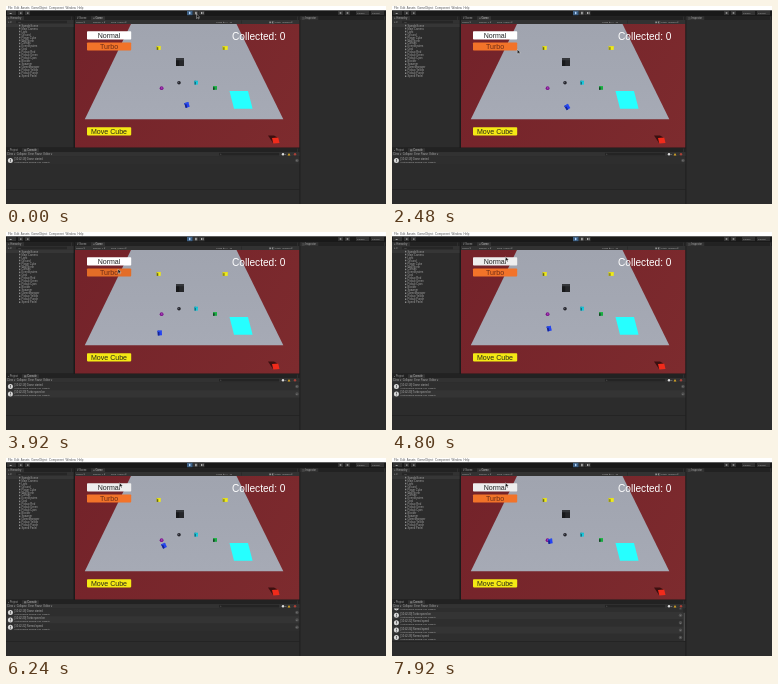
An HTML page with a canvas that plays this animation: 380x198 px, repeating every 8 s.

```html
<!DOCTYPE html>
<html lang="en">
<head>
<meta charset="utf-8">
<title>Cube game in editor</title>
<style>
html, body { margin: 0; width: 100%; height: 100%; overflow: hidden; background: #2c2c2c; }
canvas { display: block; width: 380px; height: 198px; }
</style>
</head>
<body>
<canvas id="stage"></canvas>
<script>
const W = 380, H = 198, LOOP = 8000;
const canvas = document.getElementById('stage');
const dpr = window.devicePixelRatio || 1;
canvas.width = W * dpr;
canvas.height = H * dpr;
const g = canvas.getContext('2d');
const FONT = '"Liberation Sans", Arial, sans-serif';
const PANEL = '#2c2c2c', BAR = '#323232', TABS = '#222', INK = '#aaa', DIM = '#8c8c8c';

function rect(x, y, w, h, fill) {
  g.fillStyle = fill;
  g.fillRect(x, y, w, h);
}
function poly(points, fill) {
  g.fillStyle = fill;
  g.beginPath();
  points.forEach(([x, y]) => g.lineTo(x, y));
  g.closePath();
  g.fill();
}
function dot(x, y, r, fill) {
  g.fillStyle = fill;
  g.beginPath();
  g.arc(x, y, r, 0, Math.PI * 2);
  g.fill();
}
function text(s, x, y, size, fill, align = 'left') {
  g.font = size + 'px ' + FONT;
  g.textAlign = align;
  g.fillStyle = fill;
  g.fillText(s, x, y);
}

// Linear interpolation through [time, x, y] keys
function along(keys, t) {
  let i = 1;
  while (i < keys.length - 1 && t > keys[i][0]) i++;
  const a = keys[i - 1], b = keys[i];
  const k = Math.min(1, Math.max(0, (t - a[0]) / (b[0] - a[0])));
  return [a[1] + (b[1] - a[1]) * k, a[2] + (b[2] - a[2]) * k];
}

const bluePath = [
  [0, 181, 99], [1440, 172.8, 95.5], [2480, 175.3, 101], [3920, 153.8, 101],
  [5520, 160, 93], [6880, 156.3, 83], [7920, 158.3, 83.2]
];
const cursorPath = [
  [960, 190.5, 8], [1440, 104, 43], [1900, 108, 43], [2400, 125.3, 43.5],
  [2750, 125.3, 43.5], [3050, 112, 37], [4500, 112, 37], [4800, 113.5, 24.8]
];
const logTimes = [-1, 3120, 4960, 6480, 6720];
const messages = ['Game started', 'Turbo speed on', 'Normal speed', 'Normal speed', 'Normal speed'];
const objects = ['SampleScene', 'Main Camera', 'Light', 'Ground', 'Player Cube', 'Wall North', 'Canvas',
  'EventSystem', 'Goal', 'Pickup Red', 'Pickup Green', 'Pickup Cyan', 'Blocker', 'Spawner',
  'GameManager', 'Pickup Yellow', 'Pickup Purple', 'Speed Panel'];

function menuBar() {
  rect(0, 3.8, W, 6.4, '#191919');
  rect(0, 0, W, 4.3, '#fff');
  text('File  Edit  Assets  GameObject  Component  Window  Help', 2, 3.2, 2.9, '#555');
  rect(1, 5, 9, 4, BAR);
  text('☁', 3, 8.3, 3, INK);
  for (const x of [12, 19]) {
    rect(x, 5, 5, 4, BAR);
    rect(x + 2, 6.5, 1.5, 1.2, INK);
  }
  rect(181, 4.8, 5.6, 4.4, '#3e6185');
  rect(187, 4.8, 5.6, 4.4, BAR);
  rect(193, 4.8, 5.6, 4.4, BAR);
  poly([[183, 5.6], [185, 7], [183, 8.4]], '#b8d8ff');
  rect(189, 5.8, .7, 2.5, '#ccc');
  rect(190.4, 5.8, .7, 2.5, '#ccc');
  poly([[195, 5.8], [196.7, 7], [195, 8.2]], '#ccc');
  rect(196.8, 5.8, .6, 2.4, '#ccc');
  for (const x of [332, 339]) {
    rect(x, 5, 5, 4, BAR);
    dot(x + 2.5, 7, 1, DIM);
  }
  for (const [x, s] of [[351, 'Layers'], [366, 'Layout']]) {
    rect(x - 1, 5, 13, 4, BAR);
    text(s, x, 8, 2.5, INK);
  }
}

function hierarchy() {
  rect(0, 10.2, 67.5, 131.3, PANEL);
  rect(0, 10.2, 67.5, 3.8, TABS);
  rect(0, 10.2, 18, 3.8, BAR);
  text('≡ Hierarchy', 2, 13.1, 2.6, INK);
  text('⋮', 64, 13.1, 3, INK);
  rect(0, 14, 67.5, 3.8, BAR);
  text('+ ▾', 2, 16.9, 2.7, INK);
  rect(10, 14.7, 51, 2.5, '#262626');
  text('All', 12, 16.7, 2.3, DIM);
  rect(0, 18, 67.5, 3, '#363636');
  objects.forEach((name, i) => {
    const y = 20.6 + i * 2.98;
    rect(13, y - 1.8, 1.3, 1.5, DIM);
    text(name, 15.5, y, 2.7, '#a2a2a2');
  });
}

function cube(x, y, w, h, face, side, top, a = 0) {
  g.save();
  g.translate(x, y);
  g.rotate(a);
  rect(-w / 2, -h / 2, w, h, face);
  rect(-w / 2, -h / 2, w * .4, h, side);
  rect(-w / 2, -h / 2, w, h * .28, top);
  g.restore();
}

function button(label, y, fill, ink) {
  g.fillStyle = fill;
  g.beginPath();
  g.roundRect(81, y, 44.2, 8.2, .8);
  g.fill();
  text(label, 103, y + 6.6, 7.05, ink, 'center');
}

function gameView(t) {
  rect(69, 10.2, 224.5, 7.8, BAR);
  rect(69, 10.2, 224.5, 3.8, TABS);
  rect(85, 10.2, 14, 3.8, BAR);
  text('# Scene', 71, 13.1, 2.6, INK);
  text('∞ Game', 87, 13.1, 2.6, '#ccc');
  text('⋮', 290, 13.1, 3, INK);
  text('Game ▾', 70, 16.9, 2.5, INK);
  text('Display 1 ▾', 87, 16.9, 2.5, INK);
  text('Free Aspect ▾', 105, 16.9, 2.5, INK);
  text('Scale ●──  1x', 210, 16.9, 2.5, INK);
  rect(235, 14.5, .5, 3, '#222');
  text('▣ ◧ Stats  Gizmos ▾', 263, 16.9, 2.5, INK);

  g.save();
  g.beginPath();
  g.rect(69, 18, 224.3, 123.5);
  g.clip();
  const ground = g.createLinearGradient(90, 18, 290, 142);
  ground.addColorStop(0, '#74232a');
  ground.addColorStop(1, '#7d2b2e');
  rect(69, 18, 225, 124, ground);

  const floor = g.createLinearGradient(0, 18, 0, 113);
  floor.addColorStop(0, '#a0a4af');
  floor.addColorStop(1, '#a6aab5');
  poly([[125, 18], [230.5, 18], [277.3, 113.3], [78.8, 113.3]], floor);

  poly([[223.5, 85], [242, 85], [246.6, 102.8], [228, 102.8]], '#26ffff');
  cube(174, 56, 8, 8, '#252629', '#17181a', '#35373b');
  cube(152.7, 42, 4, 3.8, '#f0ec18', '#686817', '#e5df20');
  cube(219.2, 42, 5, 3.8, '#f0ec18', '#92901b', '#e5df20');
  dot(173, 76.7, 1.8, '#25252b');
  dot(172.6, 76.4, .6, '#555967');
  cube(190.2, 76.7, 3.4, 3.8, '#16c9dc', '#116477', '#19bed0');
  cube(209, 82, 4, 3.6, '#18aa41', '#174126', '#23b84a');
  dot(155.6, 82.2, 1.9, '#7c178d');
  dot(155.8, 82, .7, '#bf55c9');
  poly([[262, 129.6], [268, 129.4], [272, 131.8], [267.2, 137.2]], '#3b1010');
  poly([[266, 132], [272.2, 131.6], [273.5, 137], [267.3, 137.4]], '#f12b1b');

  const [bx, by] = along(bluePath, t);
  const stopped = Math.min(t, 6880);
  cube(bx, by, 4.2, 4.8, '#2442f2', '#17258c', '#2b4ee8', -.3 + .25 * Math.sin(stopped / 520));

  const overNormal = t > 4700 || (t > 2850 && t < 2900);
  const overTurbo = t > 2950 && t < 4650;
  button('Normal', 25.3, overNormal ? '#eeeeee' : '#fff', '#252525');
  button('Turbo', 36.4, overTurbo ? '#e36d27' : '#f27329', '#6c2b16');
  button('Move Cube', 121.2, '#f4e914', '#292718');
  text('Collected: 0', 226, 34.3, 10.15, '#fff');
  g.restore();
}

function inspector() {
  rect(294.3, 10.2, 86, 188, PANEL);
  rect(294.3, 10.2, 86, 3.8, TABS);
  rect(294.3, 10.2, 18, 3.8, BAR);
  text('ⓘ Inspector', 296, 13.1, 2.6, INK);
  text('⋮', 377, 13.1, 3, INK);
}

function consolePanel(t) {
  const count = logTimes.filter(s => s <= t).length;
  const scrolled = count > 4;
  rect(0, 142.3, 293.5, 56, PANEL);
  rect(0, 142.3, 293.5, 3.8, TABS);
  rect(16, 142.3, 17, 3.8, BAR);
  text('▪ Project', 2, 145.2, 2.6, INK);
  text('▤ Console', 18, 145.2, 2.6, '#ccc');
  text('⋮', 290, 145.2, 3, INK);
  rect(0, 146.1, 293.5, 4.2, BAR);
  text('Clear ▾  Collapse  Error Pause  Editor ▾', 1, 149.1, 2.6, INK);
  rect(213, 146.9, 60, 2.6, '#242424');
  text('⌕', 214, 149.1, 2.7, INK);
  dot(277, 148.2, 1.2, '#ddd');
  text(count, 279, 149.1, 2.5, '#ccc');
  poly([[283, 147], [284.4, 149.4], [281.6, 149.4]], '#dda925');
  dot(289, 148.2, 1.2, '#a84037');

  g.save();
  g.beginPath();
  g.rect(0, 150.4, 293.5, 33);
  g.clip();
  const right = scrolled ? 288.5 : 291;
  for (let i = 0; i < count; i++) {
    const y = 154.5 + i * 7.4 - (scrolled ? 4.6 : 0);
    rect(0, y - 3.7, 293.5, 7.4, i % 2 ? '#343434' : '#2e2e2e');
    dot(4.4, y, 2.5, '#d5d5d5');
    rect(4.1, y - 1.5, .7, 1.8, '#333');
    rect(4.1, y + .8, .7, .7, '#333');
    text('[10:42:' + (18 + i * 2) + '] ' + messages[i], 8.6, y - .6, 2.6, INK);
    text('UnityEngine.Debug:Log (object)', 8.6, y + 2.4, 2.5, INK);
    dot(right, y, 1.7, '#505050');
    text('1', right, y + .9, 2.3, INK, 'center');
  }
  if (scrolled) {
    rect(291.2, 150.4, 2.2, 33, '#282828');
    rect(291.6, 154.8, 1.3, 28, '#505050');
  }
  g.restore();
  rect(0, 183.2, 293.5, .6, '#1e1e1e');
}

function cursor(t) {
  const [x, y] = along(cursorPath, t);
  g.save();
  g.translate(x, y);
  poly([[0, 0], [0, 4.5], [1.1, 3.5], [1.9, 5], [2.6, 4.6], [1.9, 3.2], [3.2, 3.1]], '#161616');
  g.strokeStyle = '#fff';
  g.lineWidth = .35;
  g.stroke();
  g.restore();
}

function draw(now) {
  const t = now % LOOP;
  g.setTransform(dpr, 0, 0, dpr, 0, 0);
  rect(0, 0, W, H, '#1b1b1b');
  menuBar();
  hierarchy();
  gameView(t);
  inspector();
  consolePanel(t);
  cursor(t);
}

const start = performance.now();
function tick() {
  draw(performance.now() - start);
  requestAnimationFrame(tick);
}
tick();
</script>
</body>
</html>
```
